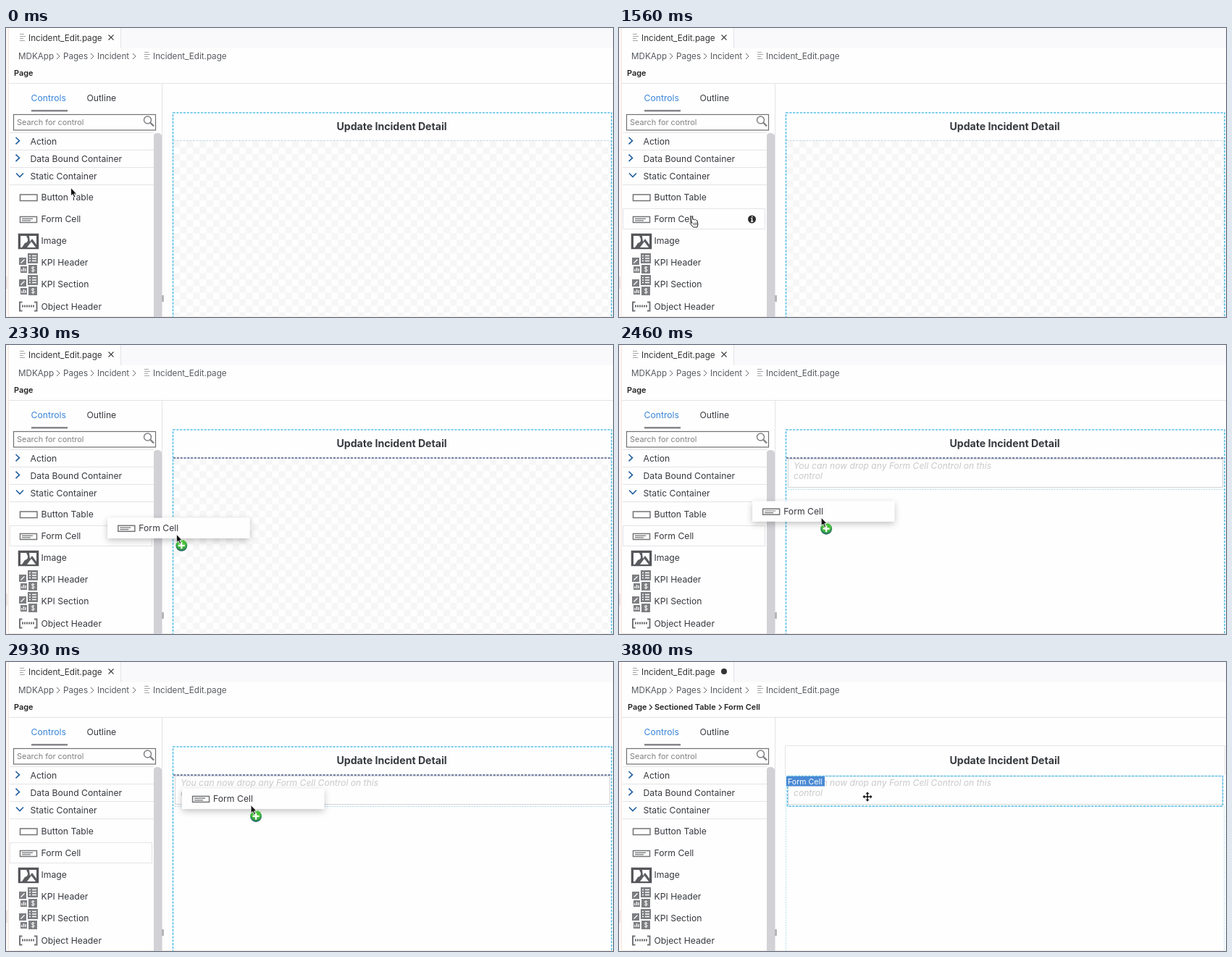
An HTML page for the animation above (5000 ms loop, 838 by 399 pixels).

```html
<!DOCTYPE html>
<html lang="en">
<head>
<meta charset="utf-8">
<style>
html, body { margin: 0; width: 100%; height: 100%; overflow: hidden; background: #fefefe; }
svg { display: block; width: 838px; height: 399px; font-family: Inter, Roboto, sans-serif; fill: none; }
text { fill: #36393e; white-space: pre; }
.row { font-size: 12.2px; }
.crumb { font-size: 11.65px; fill: #585b60; }
.bold { font-size: 10.9px; font-weight: 600; fill: #222; }
.hint { font-size: 12.1px; font-style: italic; fill: #c9c9cb; }
.dash { stroke: #58c0e8; stroke-width: 1.6; stroke-dasharray: 3.2 1.6; }
.rule { stroke: #e4e4e6; }
.icon { stroke: #737477; stroke-width: 1.5; }
.solid { fill: #7d7e81; }
.arrow { fill: #111; stroke: #fff; stroke-width: .9; stroke-linejoin: round; }
</style>
</head>
<body>
<svg id="stage" viewBox="0 0 838 399">
  <defs>
    <pattern id="checks" x="231" y="156" width="18.2" height="18.2" patternUnits="userSpaceOnUse">
      <path d="M0 0h9.1v18.2h9.1v-9.1h-18.2z" fill="#f6f6f6"/>
    </pattern>
    <radialGradient id="green" cy=".35" r=".7">
      <stop offset=".5" stop-color="#48c23a"/><stop offset="1" stop-color="#174a74"/>
    </radialGradient>
    <filter id="shadow" x="-15%" y="-60%" width="130%" height="240%">
      <feDropShadow dx="0" dy="3" stdDeviation="5" flood-opacity=".24"/>
    </filter>
    <g id="lines" stroke="#a4a5a8"><path d="M0 .5h6M0 3.5h8M0 6.5h5M0 9.5h7"/></g>
    <g id="formIcon" class="icon">
      <rect x=".5" y=".5" width="23" height="8"/><path d="M3 3.3h15M3 5.9h12" stroke-width="1.2"/>
    </g>
    <g id="kpi">
      <path class="solid" d="M12 0h14v14h-14zM0 6h10v10h-10zM2 18h9v9h-9zM13 16h12v12h-12z"/>
      <path d="M14 3.5h2M18 3.5h6M14 7h2M18 7h6M14 10.5h2M18 10.5h6M2.5 13.5l5-5M4 25v-3M6.5 25v-5M9 25v-4" stroke="#fff" stroke-width="1.3"/>
      <path d="M21.3 19.6q-4-1.5-4 .7c0 2 4 1 4 3.2q0 2-4.3.5M19.2 18v8.5" stroke="#fff"/>
    </g>
  </defs>

  <!-- window frame -->
  <path d="M0 0h3v399h-3z" fill="#fdf8f6"/>
  <path d="M158 0h680v28h-680z" fill="#f9f9fb"/>
  <path d="M3.5 0v399M3 398.5h835" stroke="#f7e5de"/>
  <path d="M0 343h2v17h-2z" fill="#eee2e2"/>
  <path class="rule" d="M158.5 0v28M4 76.5h834M215.5 77v322"/>
  <use href="#lines" x="19" y="8"/>
  <use href="#lines" x="191" y="33"/>
  <text class="crumb" x="31" y="17.5" style="fill:#333">Incident_Edit.page</text>
  <path id="close" d="M141.5 9.5l7 7m0-7l-7 7" stroke="#444" stroke-width="1.2"/>
  <circle id="dirty" cx="145" cy="13" r="4" fill="#333"/>
  <g id="crumbs"></g>
  <text class="bold" x="11" y="66" id="pageOnly">Page</text>
  <g id="trail">
    <text class="bold" x="12" y="66">Page</text>
    <text class="bold" x="49" y="66">Sectioned Table</text>
    <text class="bold" x="145" y="66">Form Cell</text>
    <path d="M42 59l3.5 3.5-3.5 3.5M138 59l3.5 3.5-3.5 3.5" stroke="#333" stroke-width="1.3"/>
  </g>

  <!-- control list -->
  <text x="34.5" y="101" font-size="12.2" style="fill:#3a85d8">Controls</text>
  <text x="111.5" y="101" font-size="12.2">Outline</text>
  <path d="M35 113h50v2.5h-50z" fill="#85878b"/>
  <rect x="10.5" y="119.5" width="196" height="21.5" stroke="#707174" stroke-width="1.2"/>
  <text x="15" y="134" font-size="10.9" style="fill:#808184">Search for control</text>
  <circle cx="195.5" cy="127" r="5" stroke="#808184" stroke-width="1.5"/>
  <path d="M199 130.5l5 5" stroke="#808184" stroke-width="2.4"/>
  <path class="rule" d="M5 144.5h199M5 168.5h199M5 192.5h199M5 216.5h199"/>
  <path d="M204 399v-250q0-4 5-4t6 4v250z" fill="#d1d1d6"/>
  <path d="M215 369h3v9h-3z" fill="#b6b6ba"/>
  <path d="M13.5 151l5 4.7-5 4.7M13.5 174.7l5 4.7-5 4.7M14 200.5l5 5 5-5" stroke="#215f9f" stroke-width="1.6"/>
  <g id="hover">
    <rect x="5.5" y="249.5" width="196" height="28" fill="#fefefe" stroke="#e3e4e8"/>
    <g id="info"><circle cx="183.5" cy="264" r="5.5" fill="#2b2c2e"/>
      <path d="M182.3 263h1.3v4M182 267h3.3M183 260.5h1.5" stroke="#fff" stroke-width="1.3"/></g>
  </g>
  <g id="rows"></g>
  <rect class="icon" x="19.5" y="230" width="23.5" height="8.5"/>
  <use href="#formIcon" x="19" y="260"/>
  <rect x="18" y="285" width="26" height="19" stroke="#55565a" stroke-width="2.5" fill="#5b5c60"/>
  <path d="M20 287h8q5 8-2 10l-4 6h-2zM29 303l6-8 6 8zM32 287h10v12l-6-8-3 4z" fill="#fff"/>
  <use href="#kpi" x="18" y="311"/>
  <use href="#kpi" x="18" y="341"/>
  <path class="icon" d="M22.5 378.5h-3.5v12h3.500M39 378.5h3.500v12h-3.500" style="stroke-width:2"/>
  <path class="icon" d="M22 384h17" stroke-dasharray="2 1" style="stroke-width:3"/>

  <!-- page canvas -->
  <rect id="checkArea" x="231" y="156" width="605" height="243" fill="url(#checks)"/>
  <path id="headRule" d="M231 155.5h605" stroke="#bfd9e6" stroke-dasharray="3 1.5"/>
  <text x="456.5" y="140.5" font-size="14.1" font-weight="700">Update Incident Detail</text>
  <g id="slot">
    <rect x="233.5" y="157.5" width="600" height="39" stroke="#d4d5d8"/>
    <path d="M233 199.5h603" stroke="#a9dcef" stroke-dasharray="2 1.5"/>
    <text class="hint" x="241" y="171">You can now drop any Form Cell Control on this</text>
    <text class="hint" x="241" y="185">control</text>
  </g>
  <rect id="pageBox" class="dash" x="230.5" y="117" width="605.5" height="290"/>
  <path id="dropLine" d="M231 156h605" stroke="#4a5a85" stroke-width="1.5" stroke-dasharray="3.2 1.6"/>
  <g id="selected">
    <path class="rule" d="M229.5 156v-40.5h607v40.5"/>
    <path d="M230.5 156v243M835.5 199v200" stroke="#b5e0f1" stroke-dasharray="2 1.5"/>
    <rect class="dash" x="232.5" y="157.5" width="601" height="41.5"/>
  </g>
  <g id="label">
    <path d="M231 158h53v13.5h-53z" fill="#4a89d4"/>
    <text x="233" y="168.5" font-size="10.6" style="fill:#fff">Form Cell</text>
  </g>

  <!-- pointer, origin at its tip -->
  <g id="pointer">
    <g id="ghost">
      <rect x="-95" y="-23" width="196" height="28" fill="#fefefe" filter="url(#shadow)"/>
      <use href="#formIcon" x="-81" y="-13"/>
      <text class="row" x="-52" y="-4.5">Form Cell</text>
      <circle cx="7" cy="15" r="8" fill="url(#green)"/>
      <path d="M7 10.5v9M2.5 15h9" stroke="#fff" stroke-width="2.2"/>
    </g>
    <path id="arrow" class="arrow" d="M0-.5v11.5l2.6-2.4 1.9 4.4 2-.8-1.9-4.3h3.4z"/>
    <g id="hand" stroke="#222" stroke-linejoin="round">
      <path d="M-1.500-1.500q1.500-1.500 2.300.3l1.400 4 1-.8 1.300.8 1.300-.3 1 1 1 .2 1.200 5-1 4.300h-5.500l-4.500-5.500q.3-1.500 2-.5l.8.7z" fill="#fff"/>
      <path d="M3 7l.8 3.500M5 6.700l.8 3.500M7 6.500l.7 3.300" stroke-width=".8"/>
    </g>
    <path id="move" d="M-1-10l3 3.500h-2v2.500h2.500v-2l3.500 3-3.500 3v-2h-2.500v2.500h2l-3 3.500-3-3.500h2v-2.500h-2.500v2l-3.500-3 3.500-3v2h2.500v-2.500h-2z" fill="#111" stroke="#fff" stroke-width=".6"/>
  </g>
</svg>
<script>
const $ = id => document.getElementById(id);
const textRows = (cls, rows) => rows.map(([x, y, s]) => `<text class="${cls}" x="${x}" y="${y}">${s}</text>`).join('');

$('rows').innerHTML = textRows('row', [
  [33.5, 161, 'Action'], [33.5, 185, 'Data Bound Container'], [33.5, 209, 'Static Container'],
  ...['Button Table', 'Form Cell', 'Image', 'KPI Header', 'KPI Section', 'Object Header']
    .map((name, i) => [48.5, 238 + i * 30.1, name])
]);
$('crumbs').innerHTML = textRows('crumb', [
  [17, 43, 'MDKApp'], [79, 43, 'Pages'], [126, 43, 'Incident'], [203, 43, 'Incident_Edit.page']
]) + [70, 117, 175].map(x => `<path d="M${x} 35l4 4-4 4" stroke="#66696d"/>`).join('');

// pointer path: time, x, y
const path = [
  [30, 89.5, 221], [230, 75, 211], [1030, 75, 211], [1530, 100, 262], [1700, 100, 262],
  [2030, 112, 266], [2130, 122, 267], [2330, 235, 262], [2600, 326, 214],
  [2660, 330, 210], [3130, 344, 189]
];

function pointerAt(t) {
  const i = path.findIndex(p => p[0] > t);
  if (i < 0) return path[path.length - 1].slice(1);
  const b = path[i], a = path[i - 1] || b;
  const k = a === b ? 0 : (t - a[0]) / (b[0] - a[0]);
  return [1, 2].map(n => a[n] + (b[n] - a[n]) * k);
}

// visible spans: start, end
const spans = {
  close: [0, 3730], dirty: [3730, 5000],
  pageOnly: [0, 3600], trail: [3600, 5000],
  hover: [1560, 3500], info: [1560, 1730],
  checkArea: [0, 2460], headRule: [0, 2260], dropLine: [2260, 3460],
  slot: [2460, 5000], pageBox: [0, 3600], selected: [3600, 5000], label: [3730, 5000],
  ghost: [1730, 3460], hand: [1560, 1730], move: [3800, 5000]
};

function draw() {
  const t = performance.now() % 5000;
  const on = {};
  for (const id in spans) {
    on[id] = t >= spans[id][0] && t < spans[id][1];
    $(id).style.display = on[id] ? '' : 'none';
  }
  $('arrow').style.display = on.hand || on.move ? 'none' : '';
  $('pointer').setAttribute('transform', `translate(${pointerAt(t)})`);
  requestAnimationFrame(draw);
}
draw();
</script>
</body>
</html>
```
